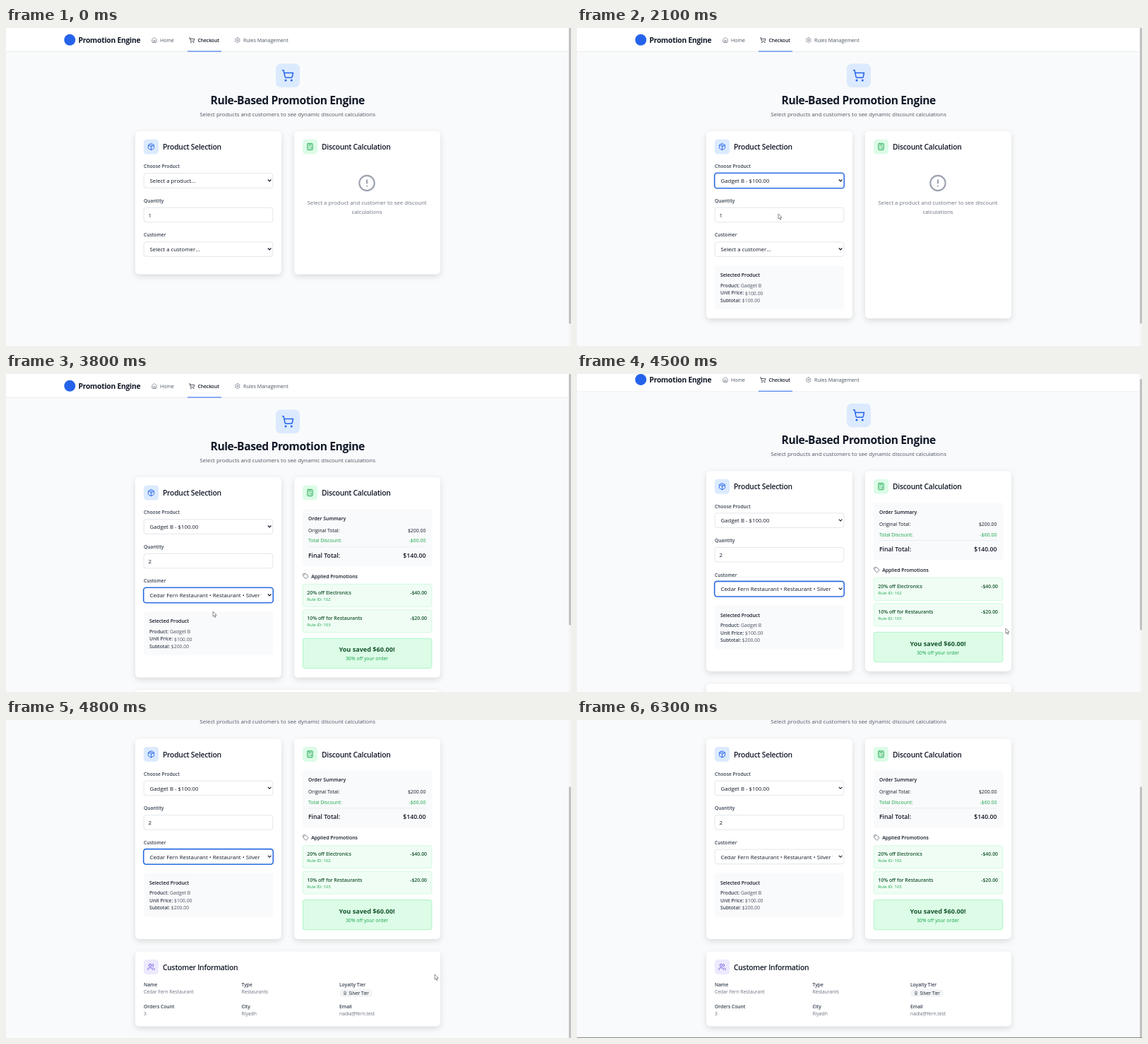
An HTML page with a canvas for the animation above (6400 ms loop, 800 by 450 pixels).

```html
<!DOCTYPE html>
<html lang="en">
<head>
<meta charset="utf-8">
<title>Promotion Engine</title>
<style>
html, body { margin: 0; width: 100%; height: 100%; overflow: hidden; background: #f9fafb; }
canvas { display: block; width: 800px; height: 450px; }
</style>
</head>
<body>
<canvas id="stage"></canvas>
<script>
const LOOP = 6400, STEP = 100;
const canvas = document.getElementById('stage');
const ctx = canvas.getContext('2d');
const dpr = window.devicePixelRatio || 1;
canvas.width = 800 * dpr;
canvas.height = 450 * dpr;

const INK = '#111827', DARK = '#374151', MID = '#4b5563', GRAY = '#6b7280';
const BLUE = '#2563eb', GREEN = '#16a34a', FOREST = '#14532d';
const BODY = 6.9, LABEL = 6.7, FIELD = 7.85, HEAD = 10.35;
const PRODUCT = 'Gadget B', CUSTOMER = 'Cedar Fern Restaurant';

// Outlines on a 24 unit grid
const ICONS = {
  home: 'M3 10a2 2 0 0 1 .7-1.5l7-6a2 2 0 0 1 2.6 0l7 6A2 2 0 0 1 21 10v9a2 2 0 0 1-2 2H5a2 2 0 0 1-2-2zM9 21v-8h6v8',
  cart: 'M2 2h2l2.7 12.4a2 2 0 0 0 2 1.6h9.7a2 2 0 0 0 2-1.6L22 7H5.1M9 21a1 1 0 1 1-2 0a1 1 0 1 1 2 0M20 21a1 1 0 1 1-2 0a1 1 0 1 1 2 0',
  box: 'M21 8a2 2 0 0 0-1-1.7l-7-4a2 2 0 0 0-2 0l-7 4A2 2 0 0 0 3 8v8a2 2 0 0 0 1 1.7l7 4a2 2 0 0 0 2 0l7-4a2 2 0 0 0 1-1.7zM3.3 7L12 12l8.7-5M12 22V12M7.5 4.3l9 5.1',
  calc: 'M6 2h12a2 2 0 0 1 2 2v16a2 2 0 0 1-2 2H6a2 2 0 0 1-2-2V4a2 2 0 0 1 2-2zM8 6h8M16 14v4M16 10h.01M12 10h.01M8 10h.01M12 14h.01M8 14h.01M12 18h.01M8 18h.01',
  alert: 'M22 12a10 10 0 1 1-20 0a10 10 0 1 1 20 0M12 8v4M12 16h.01',
  tag: 'M12.6 2.6A2 2 0 0 0 11.2 2H4a2 2 0 0 0-2 2v7.2a2 2 0 0 0 .6 1.4l8.7 8.7a2.4 2.4 0 0 0 3.4 0l6.6-6.6a2.4 2.4 0 0 0 0-3.4zM7.5 7.5h.01',
  users: 'M16 21v-2a4 4 0 0 0-4-4H6a4 4 0 0 0-4 4v2M13 7a4 4 0 1 1-8 0a4 4 0 1 1 8 0M22 21v-2a4 4 0 0 0-3-3.9M16 3.1a4 4 0 0 1 0 7.8',
  award: 'M18 8a6 6 0 1 1-12 0a6 6 0 1 1 12 0M15.5 12.9L17 22l-5-3-5 3 1.5-9.1',
  gear: gearPath()
};

function gearPath() {
  let d = 'M15 12a3 3 0 1 1-6 0a3 3 0 1 1 6 0';
  for (let i = 0; i <= 48; i++) {
    const a = i * Math.PI / 24, r = 8.9 + 1.3 * Math.cos(a * 6);
    d += (i ? 'L' : 'M') + (12 + r * Math.sin(a)) + ' ' + (12 - r * Math.cos(a));
  }
  return d + 'z';
}

// cy is the middle of the capitals
function text(str, x, cy, size, color, weight = 400, align = 'left', track = 0) {
  ctx.font = `${weight} ${size}px "Open Sans", "Noto Sans", sans-serif`;
  ctx.letterSpacing = track * size + 'px';
  ctx.textAlign = align;
  ctx.fillStyle = color;
  ctx.fillText(str, x, cy + size * 0.357);
}

function icon(name, cx, cy, size, color) {
  ctx.save();
  ctx.translate(cx - size / 2, cy - size / 2);
  ctx.scale(size / 24, size / 24);
  ctx.lineWidth = 2;
  ctx.lineCap = ctx.lineJoin = 'round';
  ctx.strokeStyle = color;
  ctx.stroke(new Path2D(ICONS[name]));
  ctx.restore();
}

function rect(x, y, w, h, r, fill, line, width = 0.6) {
  ctx.beginPath();
  ctx.roundRect(x, y, w, h, r);
  if (fill) { ctx.fillStyle = fill; ctx.fill(); }
  if (line) { ctx.strokeStyle = line; ctx.lineWidth = width; ctx.stroke(); }
}

function card(x, y, w, h, name, tint, color, title) {
  ctx.save();
  ctx.shadowColor = 'rgba(0,0,0,0.13)';
  ctx.shadowBlur = 8 * dpr;
  ctx.shadowOffsetY = 3 * dpr;
  rect(x, y, w, h, 5.5, '#fff');
  ctx.restore();
  rect(x + 12, y + 11.5, 21, 21, 4.5, tint);
  icon(name, x + 22.5, y + 22, 11, color);
  text(title, x + 39, y + 22.5, HEAD, INK, 600, 'left', -0.025);
}

function field(label, value, y, x, focused, isSelect) {
  text(label, 195, y - 9.4, LABEL, DARK, 600);
  rect(195.2, y + 0.2, 182.6, 20.6, 3.2, '#fff', '#d1d5db');
  if (focused) rect(194.7, y - 0.3, 183.6, 21.6, 3.6, null, '#2f6fe4', 1.6);
  ctx.save();
  ctx.beginPath();
  ctx.rect(196, y, 166, 21);
  ctx.clip();
  text(value, x, y + 10.8, FIELD, INK);
  ctx.restore();
  if (!isSelect) return;
  ctx.beginPath();
  ctx.moveTo(370.8, y + 9);
  ctx.lineTo(373.1, y + 11.4);
  ctx.lineTo(375.4, y + 9);
  ctx.strokeStyle = INK;
  ctx.lineWidth = 1.1;
  ctx.stroke();
}

function pair(label, value, y) {
  text(label, 203, y, LABEL, DARK, 600);
  const w = ctx.measureText(label + ' ').width;
  text(value, 203 + w, y, BODY, MID);
}

function sumRow(label, value, y, size, color, weight) {
  text(label, 428, y, size, color, weight);
  text(value, 594.4, y, size, color, weight, 'right');
}

function promo(label, id, value, y) {
  rect(420.3, y + 0.3, 182.6, 32, 2.5, '#f0fdf4', '#bbf7d0');
  text(label, 426.3, y + 12.4, BODY, FOREST, 600);
  text('Rule ID: ' + id, 426.3, y + 21.8, 6, GREEN);
  text(value, 596, y + 12.4, BODY, FOREST, 600, 'right');
}

function nav() {
  rect(0, 0, 800, 33.5, 0, '#fff');
  rect(0, 33, 800, 0.7, 0, '#e5e7eb');
  ctx.beginPath();
  ctx.arc(90.3, 16.8, 8, 0, 7);
  ctx.fillStyle = BLUE;
  ctx.fill();
  text('Promotion Engine', 102.5, 17.3, HEAD, INK, 700, 'left', -0.025);
  icon('home', 210, 17.2, 8.6, GRAY);
  text('Home', 218, 17.7, 7.1, MID);
  icon('cart', 263.3, 17.2, 8.6, INK);
  text('Checkout', 271.5, 17.7, LABEL, INK, 600);
  icon('gear', 327.8, 17.2, 8.6, GRAY);
  text('Rules Management', 336, 17.7, 7.1, MID);
  rect(257, 32.5, 48, 1, 0, BLUE);
}

function selection(s) {
  card(183, 146, 207, s.bottom - 146, 'box', '#dbeafe', BLUE, 'Product Selection');
  field('Choose Product', s.picked ? PRODUCT + ' - $100.00' : 'Select a product...', 205.5, 203.5, s.focus === 1, true);
  field('Quantity', String(s.qty), 254, 201.5, s.focus === 2, false);
  field('Customer', s.done ? CUSTOMER + ' • Restaurant • Silver Tier' : 'Select a customer...', 302.5, 203.5, s.focus === 3, true);
  if (!s.picked) return;
  rect(195, 336, 183, 62, 3, '#f9fafb');
  text('Selected Product', 203, 350, BODY, INK, 600);
  pair('Product:', PRODUCT, 364.6);
  pair('Unit Price:', '$100.00', 375.1);
  pair('Subtotal:', `$${s.qty}00.00`, 385.5);
}

function discount(s) {
  card(408, 146, 207, s.bottom - 146, 'calc', '#dcfce7', GREEN, 'Discount Calculation');
  if (!s.done) {
    icon('alert', 511, 219.5, 25.6, '#9ca3af');
    text('Select a product and customer to see discount', 511, 247.2, FIELD, GRAY, 400, 'center');
    text('calculations', 511, 259.8, FIELD, GRAY, 400, 'center');
    return;
  }
  rect(420, 191, 183.5, 81, 3, '#f9fafb');
  text('Order Summary', 428, 204.5, BODY, INK, 600);
  sumRow('Original Total:', '$200.00', 221.2, BODY, INK, 400);
  sumRow('Total Discount:', '-$60.00', 236, BODY, GREEN, 400);
  rect(428, 244.2, 166.4, 0.6, 0, '#e5e7eb');
  sumRow('Final Total:', '$140.00', 256.9, 8.7, INK, 600);
  icon('tag', 424.3, 286, 8.4, DARK);
  text('Applied Promotions', 432.2, 286.2, BODY, INK, 600);
  promo('20% off Electronics', 102, '-$40.00', 297);
  promo('10% off for Restaurants', 103, '-$20.00', 333.4);
  rect(420.3, 374.2, 182.6, 42.2, 2.8, '#dcfce7', '#86efac');
  text('You saved $60.00!', 511, 390.2, 9.1, FOREST, 700, 'center');
  text('30% off your order', 511, 403, BODY, GREEN, 400, 'center');
}

function customer() {
  card(183, 447, 432, 106, 'users', '#ede9fe', '#6d4fe0', 'Customer Information');
  const info = (label, value, x, y) => {
    text(label, x, y, LABEL, DARK, 600);
    text(value, x, y + 10.4, 6.75, GRAY);
  };
  info('Name', CUSTOMER, 195, 493.8);
  info('Type', 'Restaurants', 333.5, 493.8);
  info('Loyalty Tier', '', 472, 493.8);
  rect(472, 500.6, 47, 10.8, 5.4, '#f3f4f6');
  icon('award', 480, 506, 6.4, DARK);
  text('Silver Tier', 485.6, 506.2, 6.2, INK);
  info('Orders Count', '3', 195, 525.2);
  info('City', 'Riyadh', 333.5, 525.2);
  info('Email', 'nadia@fern.test', 472, 525.2);
}

const pointerKeys = [
  [600, 556, 138], [900, 556, 138], [1300, 265.5, 226], [1500, 265.5, 226],
  [1700, 262, 240], [1900, 262, 240], [2100, 285, 263], [2400, 285, 263],
  [2700, 272, 315], [2900, 272, 315], [3100, 293, 336], [3900, 293, 336],
  [4300, 607, 360], [5100, 607, 360], [5500, 560, 458]
];

function pointer(t) {
  const i = pointerKeys.findIndex(k => k[0] > t);
  if (i < 1) return;
  const [t0, x0, y0] = pointerKeys[i - 1], [t1, x1, y1] = pointerKeys[i];
  const p = (t - t0) / (t1 - t0), e = p * p * (3 - 2 * p);
  ctx.save();
  ctx.translate(x0 + (x1 - x0) * e, y0 + (y1 - y0) * e);
  const arrow = new Path2D('M0 0V7.2L1.7 5.7L2.9 8.4L4 7.9L2.9 5.3L5.2 5.2Z');
  ctx.fillStyle = '#fff';
  ctx.fill(arrow);
  ctx.strokeStyle = '#444';
  ctx.lineWidth = 0.6;
  ctx.stroke(arrow);
  ctx.restore();
}

function scrollAt(t) {
  const p = Math.min(1, Math.max(0, (t - 4392) / 408));
  return 119.6 * (p < 0.5 ? 4 * p ** 3 : 1 - 4 * (1 - p) ** 3);
}

function focusAt(t) {
  if (t < 1400 || t >= 5500) return 0;
  return t < 2200 ? 1 : t < 2700 ? 2 : 3;
}

function draw(t) {
  const picked = t >= 1800, done = t >= 3300, scroll = scrollAt(t);
  const s = {
    picked, done,
    qty: t >= 2400 ? 2 : 1,
    focus: focusAt(t),
    bottom: done ? 429.5 : picked ? 411 : 348.5
  };
  ctx.setTransform(dpr, 0, 0, dpr, 0, 0);
  rect(0, 0, 800, 450, 0, '#f9fafb');

  ctx.save();
  ctx.translate(0, -scroll);
  nav();
  rect(382, 50.5, 34, 33.5, 7, '#dbeafe');
  icon('cart', 399, 67.2, 18, BLUE);
  text('Rule-Based Promotion Engine', 398.7, 102.5, 15.6, INK, 700, 'center', -0.025);
  text('Select products and customers to see dynamic discount calculations', 398.6, 121.8, 7.87, MID, 400, 'center');
  selection(s);
  discount(s);
  if (done) customer();
  ctx.restore();

  const page = done ? 569.6 : 484;
  rect(796.5, 0, 3.5, 450, 0, '#f5f5f5');
  rect(797, scroll * 450 / page, 3, 450 * 450 / page, 1, '#c1c1c1');
  pointer(t);
  if (t >= 5500) rect(0, 449, 800, 1, 0, '#8a8a8a');
}

const start = performance.now();
function frame() {
  const t = (performance.now() - start) % LOOP;
  draw(Math.floor(t / STEP) * STEP);
  requestAnimationFrame(frame);
}
frame();
</script>
</body>
</html>
```
